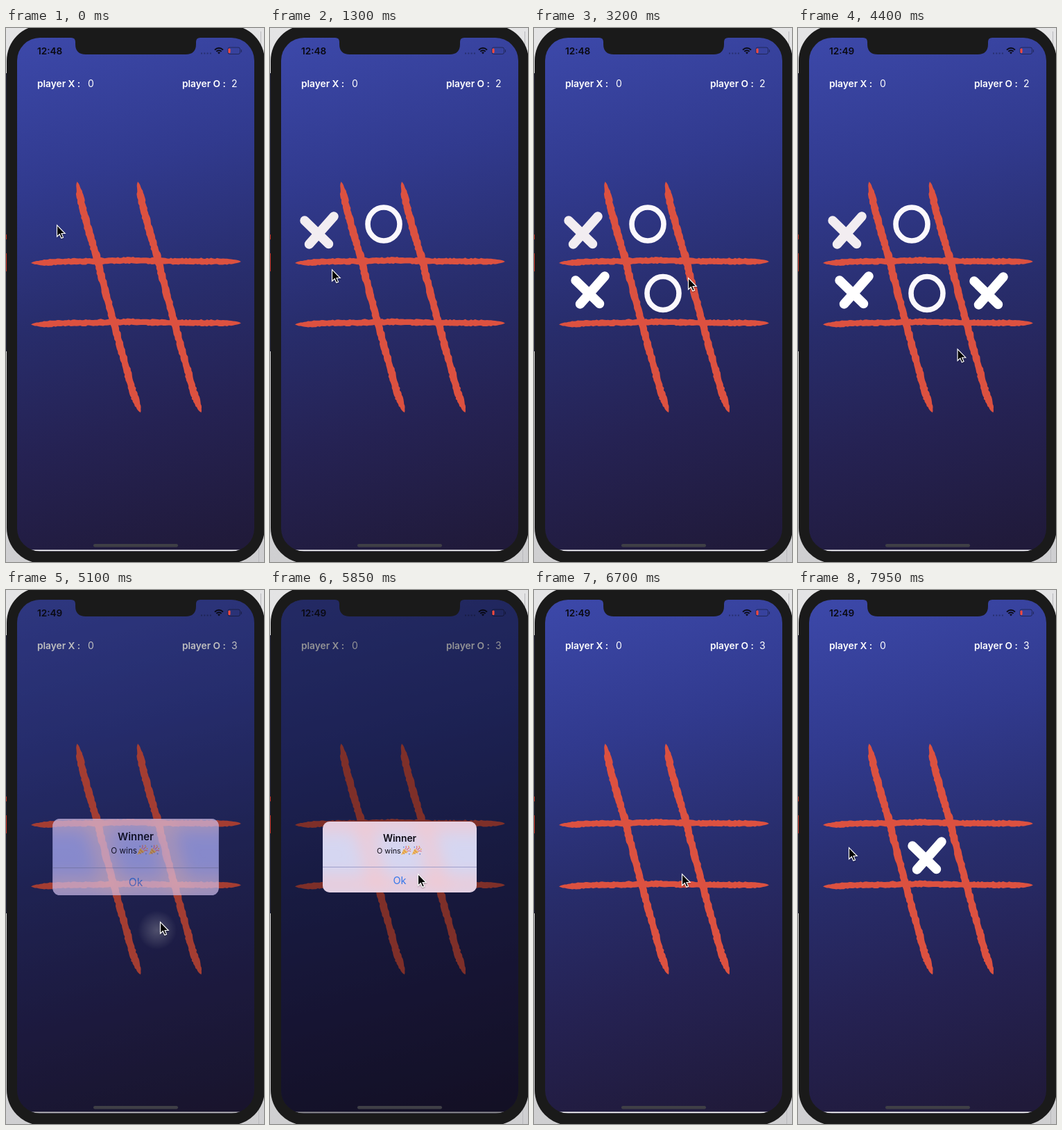
These frames come from a looping animation (372x768 px, 8 s). An HTML page:

```html
<!DOCTYPE html>
<html lang="en">
<head>
<meta charset="utf-8">
<title>Tic-tac-toe</title>
<style>
html, body { margin: 0; width: 100%; height: 100%; overflow: hidden; background: #e2e2e4; }
svg { display: block; width: 372px; height: 768px; font-family: Inter, Roboto, sans-serif; }
.b { font-weight: 600; }
</style>
</head>
<body>
<svg viewBox="0 0 372 768">
  <defs>
    <linearGradient id="sky" gradientUnits="userSpaceOnUse" x1="90" y1="0" x2="282" y2="752">
      <stop offset="0" stop-color="#3c48a9"/>
      <stop offset=".27" stop-color="#313a8e"/>
      <stop offset=".52" stop-color="#282d6c"/>
      <stop offset=".75" stop-color="#252253"/>
      <stop offset="1" stop-color="#201a3a"/>
    </linearGradient>
    <linearGradient id="desk" x1="0" y1="0" x2="0" y2="1">
      <stop offset="0" stop-color="#e4e4e5"/>
      <stop offset="1" stop-color="#cfcfd1"/>
    </linearGradient>
    <radialGradient id="halo">
      <stop offset="0" stop-color="#fff" stop-opacity=".9"/>
      <stop offset=".4" stop-color="#fff" stop-opacity=".55"/>
      <stop offset="1" stop-color="#fff" stop-opacity="0"/>
    </radialGradient>
    <clipPath id="screen"><rect x="16" y="14" width="342" height="738.500" rx="33"/></clipPath>
    <clipPath id="card"><rect x="76" y="333" width="222" height="102" rx="10"/></clipPath>
    <filter id="soft" x="-50%" y="-50%" width="200%" height="200%"><feGaussianBlur stdDeviation="13"/></filter>
    <filter id="shade"><feDropShadow dx="0" dy="1" stdDeviation="1" flood-opacity=".4"/></filter>
    <g id="x" stroke-width="13.500">
      <path d="M-21-14L13.500 19.500"/>
      <path d="M21-20L-14.500 20"/>
    </g>
    <ellipse id="o" rx="23" ry="24" fill="none" stroke-width="7.600"/>
    <g id="party">
      <path d="M0 13L4 4L10 9Z" fill="#eebb58"/>
      <path d="M2 9L5 12M3.500 6L8 10.500" stroke="#cf7a50"/>
      <path d="M6 5Q8 3 7 0M9 8Q11 6 14 8M8 6L12 2" fill="none" stroke="#e0707c" stroke-width="1.100"/>
      <path d="M3 1h1.500v1.500h-1.500zM11 11h1.500v1.500h-1.500z" fill="#5a86d8"/>
      <path d="M10 0h1.500v1.500h-1.500zM12.500 4h1.500v1.500h-1.500z" fill="#e9a83c"/>
    </g>
  </defs>

  <rect width="372" height="768" fill="url(#desk)"/>
  <path d="M367.500 5V40M364.500 735V768" stroke="#b9b9bd"/>
  <path d="M0 65H1V465H0Z" fill="#20233a"/>
  <path d="M0 297H1V304H0ZM0 324H1V350H0Z" fill="#c8342e"/>
  <rect x="1" y="-4" width="372" height="774" rx="51" fill="#1a1a1a"/>

  <g clip-path="url(#screen)">
    <rect x="16" y="14" width="342" height="739" fill="url(#sky)"/>
    <rect x="16" y="750.500" width="342" height="2" fill="#fff"/>
    <g id="grid" fill="#dc5140"></g>
    <g id="marks" stroke-linecap="round"></g>
    <g id="glows"></g>
    <g fill="#fff" font-size="13.700">
      <text class="b" x="45" y="85">player X :</text>
      <text x="118" y="85" font-size="14">0</text>
      <text class="b" x="254" y="85">player O :</text>
      <text id="score" x="325" y="85" font-size="14"></text>
    </g>
    <g fill="none" stroke="#0b0c18">
      <path d="M301 31.500Q307 26 313 31.500M303.300 33.800Q307 30.500 310.700 33.800" stroke-width="1.900"/>
      <path d="M305 35.200Q307 33.600 309 35.200L307 37.500Z" fill="#0b0c18" stroke="none"/>
      <path d="M281 36.500H296" stroke-width="2" stroke-dasharray="2 2.300" opacity=".35"/>
      <rect x="320" y="28" width="17.500" height="9.500" rx="2.500" opacity=".5"/>
      <path d="M339.500 31V35" opacity=".5"/>
    </g>
    <rect id="dim" x="16" y="14" width="342" height="739" fill="#04040a"/>
    <text id="clock" class="b" x="45" y="38" font-size="13.600" fill="#0a0a12"></text>
    <rect x="320.500" y="29.500" width="3" height="6.500" rx="1" fill="#ff4a3c"/>
    <rect x="126" y="742" width="122" height="4.500" rx="2.200" fill="#3f3f46"/>
  </g>
  <path d="M94 13H280V14Q274 14 274 20V23Q274 38 259 38H115Q100 38 100 23V20Q100 14 94 14Z" fill="#1a1a1a"/>

  <g id="alert">
    <g clip-path="url(#card)">
      <rect x="76" y="333" width="222" height="102" fill="#d5d6f1"/>
      <rect id="tint" x="76" y="333" width="222" height="102" fill="#9a9cff"/>
      <g fill="none" stroke="#f6c6cc" stroke-width="17" filter="url(#soft)">
        <path d="M60 335H315M60 424H315M131 330L160 438M219 330L248 438"/>
      </g>
    </g>
    <path d="M76 398.500H298" stroke="#9294c4" stroke-width=".8"/>
    <g text-anchor="middle">
      <text class="b" x="187" y="362" font-size="13.800" fill="#0c0a14">Winner</text>
      <text x="187" y="422.500" font-size="14.500" fill="#3577ea">Ok</text>
    </g>
    <text x="154" y="379" font-size="10.800" fill="#0c0a14">O wins</text>
    <use href="#party" x="189" y="368"/>
    <use href="#party" x="204.500" y="368"/>
  </g>

  <path id="cursor" d="M.5 .5V17L4.300 13.500L6.800 19.300L9.500 18.100L7 12.500H12.200Z" fill="#050505" stroke="#fff" stroke-width="1.100" filter="url(#shade)"/>
</svg>
<script>
const $ = id => document.getElementById(id);
const NS = "http://www.w3.org/2000/svg";
const LOOP = 8000, RELEASE = 130, WIN = 4995;

function add(parent, tag, attrs) {
  const el = document.createElementNS(NS, tag);
  for (const k in attrs) el.setAttribute(k, attrs[k]);
  return parent.appendChild(el);
}
const clamp = v => Math.max(0, Math.min(1, v));
const smooth = v => v * v * (3 - 2 * v);
const easeOut = v => 1 - (1 - v) ** 3;

function random(seed) {
  return () => (seed = (seed * 16807) % 2147483647) / 2147483647;
}

// Outline of a ragged brush stroke that follows a few spine points.
function brush(spine, half, seed) {
  const rnd = random(seed), steps = 110, sides = [[], []];
  for (let i = 0; i <= steps; i++) {
    const u = i / steps, s = Math.min(u * (spine.length - 1), spine.length - 1.001);
    const k = Math.floor(s), f = s - k, [ax, ay] = spine[k], [bx, by] = spine[k + 1];
    const x = ax + (bx - ax) * f, y = ay + (by - ay) * f;
    const len = Math.hypot(bx - ax, by - ay);
    const taper = clamp(Math.min(u, 1 - u) * 14) ** 0.6;
    [1, -1].forEach((side, j) => {
      const w = side * taper * (half + (rnd() - 0.5) * 1.6);
      sides[j].push((x - (by - ay) / len * w).toFixed(1) + " " + (y + (bx - ax) / len * w).toFixed(1));
    });
  }
  return "M" + sides[0].concat(sides[1].reverse()).join("L") + "Z";
}

const down = brush([[102.500, 221], [109.500, 255], [119, 291], [130, 327], [140.500, 368], [151.500, 409], [163, 451], [174.500, 493], [184, 527], [194, 553]], 5.2, 71);
const across = brush([[36, 338], [86, 336], [136, 335], [186, 334], [236, 335.500], [286, 335.500], [339, 336]], 4.4, 409);
[[down, 0, 0], [down, 87.500, 0], [across, 0, 0], [across, 0, 88.500]].forEach(([d, x, y]) =>
  add($("grid"), "path", { d, transform: `translate(${x} ${y})` }));

// Moves: mark, centre, press time, removal time, colour.
const moves = [
  ["x", 71, 291, 250, WIN, "#f2edf1"],
  ["o", 164, 282, 820, WIN, "#fbf8fc"],
  ["x", 81, 377, 1620, WIN, "#fff"],
  ["o", 186, 381.500, 2420, WIN, "#fbf8fc"],
  ["x", 275, 378, 3600, WIN, "#fff"],
  ["", 218, 489, 4800, WIN, "#fff"],
  ["x", 186, 382, 7150, LOOP, "#fff"]
].map(([kind, x, y, press, end, stroke]) => ({
  press, end,
  mark: kind && add($("marks"), "use", { href: "#" + kind, x, y, stroke }),
  glow: add($("glows"), "circle", { cx: x, cy: y, r: 28, fill: "url(#halo)" })
}));

// Cursor tip: time, x, y.
const route = [
  [0, 73, 283], [400, 73, 284], [780, 160, 283], [980, 160, 283],
  [1300, 89, 347], [1560, 80, 374], [1820, 80, 374], [2340, 183, 376],
  [2650, 184, 376], [3200, 222, 359], [3520, 273, 372], [3780, 273, 372],
  [4600, 222, 477], [5200, 222, 477], [5750, 213, 408], [6750, 213, 408],
  [7080, 188, 383], [7350, 188, 383], [7900, 73, 370], [8000, 73, 370]
];

function cursorAt(t) {
  const i = Math.max(1, route.findIndex(p => p[0] > t));
  const [t0, x0, y0] = route[i - 1], [t1, x1, y1] = route[i];
  const v = smooth((t - t0) / (t1 - t0));
  return [x0 + (x1 - x0) * v, y0 + (y1 - y0) * v];
}

function draw(t) {
  for (const m of moves) {
    const since = t - m.press;
    if (m.mark) m.mark.style.display = since >= RELEASE && t < m.end ? "" : "none";
    m.glow.setAttribute("opacity", since < 0 ? 0 : 0.75 * clamp(since / 50) * clamp(1 - (since - RELEASE) / 320));
  }
  const enter = easeOut(clamp((t - WIN) / 400));
  const stay = 1 - smooth(clamp((t - 6200) / 300));
  const scale = 1.2 - 0.2 * enter;
  $("dim").setAttribute("opacity", 0.43 * enter * stay);
  $("tint").setAttribute("opacity", 1 - enter ** 2);
  $("alert").setAttribute("opacity", clamp(enter * 1.2) * stay);
  $("alert").setAttribute("transform", `translate(187 384) scale(${scale}) translate(-187 -384)`);
  $("score").textContent = t < WIN ? "2" : "3";
  $("clock").textContent = t < 4000 ? "12:48" : "12:49";
  $("cursor").setAttribute("transform", `translate(${cursorAt(t)})`);
}

const start = performance.now();
function tick() {
  draw((performance.now() - start) % LOOP);
  requestAnimationFrame(tick);
}
tick();
</script>
</body>
</html>
```
